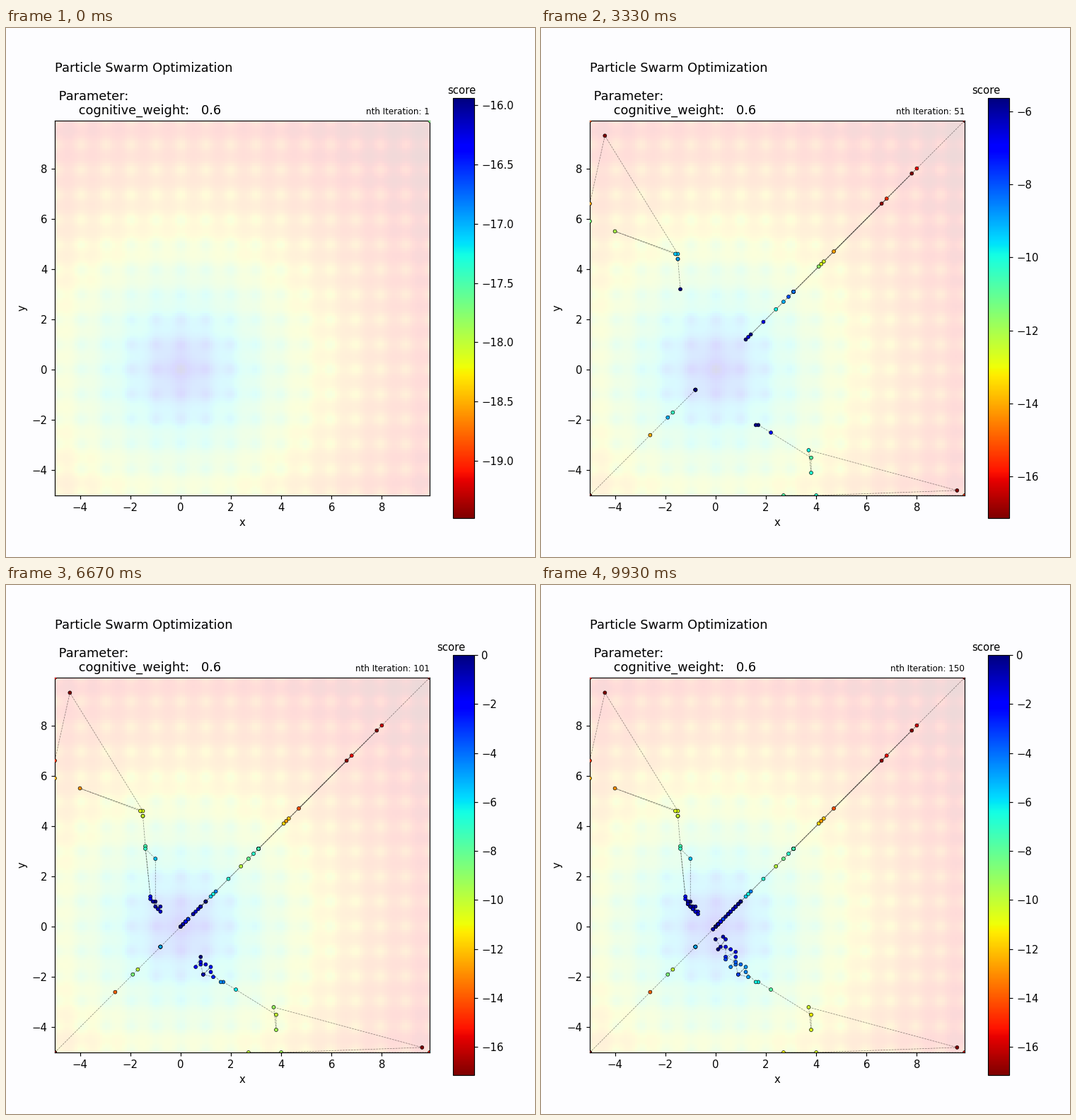
Recreate the animation shown at these times as a matplotlib script. Size 748 by 748 pixels, loop 9990 ms.

```python
import numpy as np
import matplotlib.pyplot as plt
from matplotlib.animation import FuncAnimation
from matplotlib.cm import ScalarMappable
from matplotlib.colors import Normalize

SIZE = 748
DPI = SIZE / 7
STEPS = 150
SWARM = 5
BACK = "#fdfdff"
CMAP = "jet_r"

plt.rcParams["font.family"] = "DejaVu Sans"


def score(x, y):
    """Negative Ackley function: the best value is 0 at the origin."""
    bowl = 20 * (1 - np.exp(-0.2 * np.sqrt((x * x + y * y) / 2)))
    waves = np.e - np.exp((np.cos(2 * np.pi * x) + np.cos(2 * np.pi * y)) / 2)
    return -(bowl + waves)


def diagonal(*values):
    return [(v, v) for v in values]


def settle(keys, start, end, swing, phase=0):
    """Follow the key points, then drift from start to end while swinging.

    Positions lie on the search grid, which has steps of 0.1.
    """
    k = np.arange(STEPS // SWARM - len(keys))
    wave = np.sin(2.4 * k[:, None] + [0, phase])
    drift = np.linspace(start, end, len(k)) + swing * wave
    return np.round(np.vstack([keys, drift]), 1)


# Four particles start in the corners, the fifth inside the field.
top_right = settle(
    diagonal(9.9, 3.1, 4.3, 6.8) + diagonal(3.1) * 4 + diagonal(2.9, 2.7, 1.4),
    start=(0.8, 0.8), end=(0.65, 0.65), swing=0.25)
top_left = settle(
    [(-5, 9.9), (-5, 5.9), (-5, 6.6), (-4.4, 9.3), (-1.5, 4.6), (-4, 5.5),
     (-1.6, 4.6)] + [(-1.5, 4.4)] * 2
    + [(-1.4, 3.2), (-1.2, 1.2), (-1.4, 3.1), (-1, 2.7)],
    start=(-1, 0.9), end=(-0.9, 0.7), swing=0.2, phase=2.8)
bottom_left = settle(
    diagonal(-5) * 3 + diagonal(-2.6, -1.9, -1.7) + diagonal(-0.8) * 5,
    start=(0.2, 0.2), end=(0.15, 0.15), swing=0.04)
bottom_right = settle(
    [(9.9, -5), (2.7, -5), (4, -5), (9.6, -4.8), (3.7, -3.2), (3.8, -4.1),
     (3.8, -3.5), (2.2, -2.5), (1.7, -2.2), (1.6, -2.2)],
    start=(1.2, -2), end=(0.1, -0.5), swing=0.2, phase=1)
inner = settle(
    diagonal(8, 4.7, 7.8, 6.6, 4.2, 4.1, 2.4, 1.9, 1.3, 1.2),
    start=(0.2, 0.2), end=(0, 0), swing=0.15)

paths = [top_right, top_left, bottom_left, bottom_right, inner]
scores = [score(*path.T) for path in paths]


def limits(values):
    lo, hi = values.min(), values.max()
    if hi - lo < 1e-9:
        return lo * 1.1, hi * 0.9
    return lo, hi


def box(left, top, right, bottom):
    """Axes rectangle from pixel edges measured from the top left."""
    return [left / SIZE, 1 - bottom / SIZE,
            (right - left) / SIZE, (bottom - top) / SIZE]


fig = plt.figure(figsize=(7, 7), dpi=DPI, facecolor=BACK)
ax = fig.add_axes(box(69, 131, 599, 661))
cax = fig.add_axes(box(632, 99, 662, 693))

grid = np.arange(150) * 0.1 - 5
ax.imshow(score(*np.meshgrid(grid, grid)), cmap=CMAP, alpha=0.15,
          origin="lower", extent=[-5, 9.9, -5, 9.9], aspect="auto")
ax.set(xlim=(-5, 9.9), ylim=(-5, 9.9), xlabel="x", ylabel="y")
ax.set_title("Particle Swarm Optimization\n\n Parameter:"
             "\n      cognitive_weight:   0.6",
             loc="left", fontsize=12, linespacing=1.14)
counter = ax.set_title("", loc="right", fontsize=8)

lines = [ax.plot([], [], "k--", lw=0.5, alpha=0.45, zorder=2)[0]
         for _ in paths]
dots = [ax.scatter([], [], s=11, c=[], cmap=CMAP, edgecolors="k",
                   linewidths=0.45, zorder=3) for _ in paths]

scale = ScalarMappable(Normalize(*limits(scores[0][:1])), CMAP)
bar = fig.colorbar(scale, cax=cax)
cax.set_ylabel("score", rotation=0, labelpad=-50, y=1.03)


def draw(frame):
    step = frame + 1
    for k, (path, values) in enumerate(zip(paths, scores)):
        count = (step + SWARM - 1 - k) // SWARM
        lines[k].set_data(*path[:count].T)
        dots[k].set_offsets(path[:count])
        dots[k].set_array(values[:count])
        if count:
            dots[k].set_norm(Normalize(*limits(values[:count])))
    # The colour bar follows the last particle that has been placed.
    shown = dots[min(step, SWARM) - 1].norm
    scale.set_norm(Normalize(shown.vmin, shown.vmax))
    counter.set_text(f"nth Iteration: {step}")
    return [*lines, *dots, counter]


anim = FuncAnimation(fig, draw, frames=STEPS, interval=66.6,
                     repeat=True, repeat_delay=0, blit=False)
plt.show()
```
